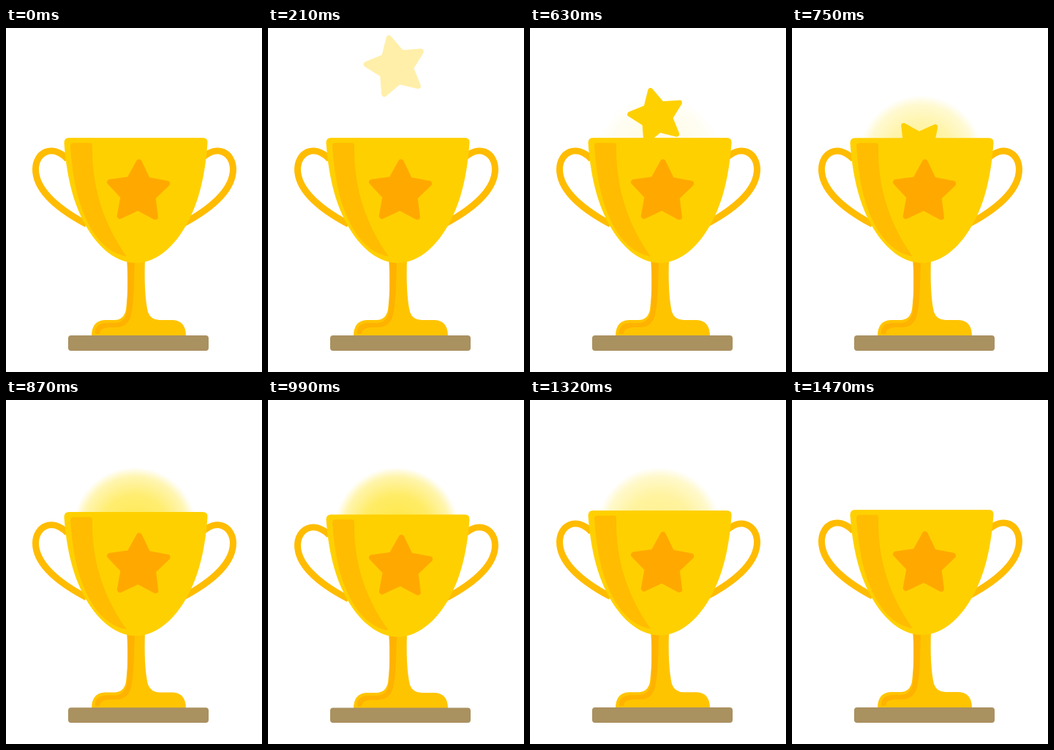
Animation of 350x470 px, one loop 1650 ms. Source, as an HTML page:

```html
<!DOCTYPE html>
<html lang="en">
<head>
<meta charset="utf-8">
<title>Trophy</title>
<style>
html, body { margin: 0; width: 100%; height: 100%; overflow: hidden; background: #fff; }
svg { display: block; width: 350px; height: 470px; }
</style>
</head>
<body>
<svg viewBox="0 0 350 470">
  <defs>
    <radialGradient id="shine">
      <stop offset="0" stop-color="#ffdf00" stop-opacity=".75"/>
      <stop offset=".55" stop-color="#ffdf00" stop-opacity=".6"/>
      <stop offset=".85" stop-color="#ffdf00" stop-opacity=".33"/>
      <stop offset="1" stop-color="#ffdf00" stop-opacity="0"/>
    </radialGradient>
    <path id="handle" d="M84 179C62 157 40.5 171 40.5 193C40.5 217 63 243 110 268" fill="none" stroke="#ffbc00" stroke-width="9"/>
  </defs>

  <circle id="glow" cx="176" cy="177" r="85" fill="url(#shine)"/>
  <polygon id="drop" class="star" fill="#ffd000" stroke="#ffd000" stroke-width="8" stroke-linejoin="round"/>

  <g id="trophy">
    <use href="#handle"/>
    <use href="#handle" transform="translate(351) scale(-1 1)"/>
    <path fill="#ffc400" d="M165 316H190C189 345 190 370 194 388Q198 399 210 399H228Q246 400 246 421H117Q117 400 135 399H148Q161 399 164 385C167 360 167 340 165 316Z"/>
    <path fill="#ffb200" d="M166 316H176C175 350 175 375 171 392Q167 409 150 409H140Q128 410 128 418H122Q121 404 137 403H150Q162 402 165 388Q167 360 166 316Z"/>
    <path fill="#ffd000" d="M86 150H269Q276 150 275.5 157C271.5 212 260 245 246 270C233 293 209 321 177.5 321C146 321 122 293 109 270C95 245 83.5 212 79.5 157Q79.5 150 86 150Z"/>
    <path fill="#ffbc00" d="M92 157H115Q118 157 118 161C117 220 135 270 165 312C145 309 127 294 114 270C98 240 91 205 88 161Q88 157 92 157Z"/>
    <polygon id="badge" class="star" fill="#ffa900" stroke="#ffa900" stroke-width="8" stroke-linejoin="round"/>
    <rect x="85" y="420" width="192" height="21" rx="4" fill="#aa9160"/>
  </g>
</svg>
<script>
const LOOP = 1650, STEP = 30, FLOOR = 441;
const $ = id => document.getElementById(id);
const ramp = (t, a, b) => Math.min(1, Math.max(0, (t - a) / (b - a)));
const smooth = u => u * u * (3 - 2 * u);
const mix = (a, b, u) => a + (b - a) * u;

const points = Array.from({ length: 10 }, (_, i) => {
  const r = i % 2 ? 21 : 41, a = (i * 36 - 90) * Math.PI / 180;
  return (r * Math.cos(a)).toFixed(2) + ',' + (r * Math.sin(a)).toFixed(2);
}).join(' ');
document.querySelectorAll('.star').forEach(s => s.setAttribute('points', points));

const place = (id, x, y, turn, sx, sy = sx) =>
  $(id).setAttribute('transform', `translate(${x} ${y}) rotate(${turn}) scale(${sx} ${sy})`);

function draw(t) {
  // star: fades in while settling, then falls behind the rim
  const fall = Math.max(0, (t - 330) / 300) ** 1.45;
  const size = 0.89 * mix(1.2, 1, smooth(ramp(t, 30, 390)));
  place('drop', mix(174.6, 173, ramp(t, 390, 630)), 53 + 68 * fall, 28 - 0.171 * (t - 390), size);
  $('drop').setAttribute('opacity', t < 840 ? ramp(t, 30, 570) : 0);

  $('glow').setAttribute('opacity', smooth(ramp(t, 540, 930)) * (1 - ramp(t, 1230, 1470)));

  // the trophy squashes towards the floor; the badge keeps its height
  const dip = smooth(t < 1050 ? ramp(t, 720, 1050) : 1 - ramp(t, 1050, 1410));
  const k = 1 - 7 * dip / 291;
  $('trophy').setAttribute('transform', `translate(0 ${FLOOR * (1 - k)}) scale(1 ${k})`);
  place('badge', 180.7 + 0.6 * dip, 224.3, 1.5, 1 + 0.015 * dip, 1 / k);
}

const start = performance.now();
function tick(now) {
  const t = Math.max(0, now - start) % LOOP;
  draw(Math.floor(t / STEP) * STEP);
  requestAnimationFrame(tick);
}
draw(0);
requestAnimationFrame(tick);
</script>
</body>
</html>
```
